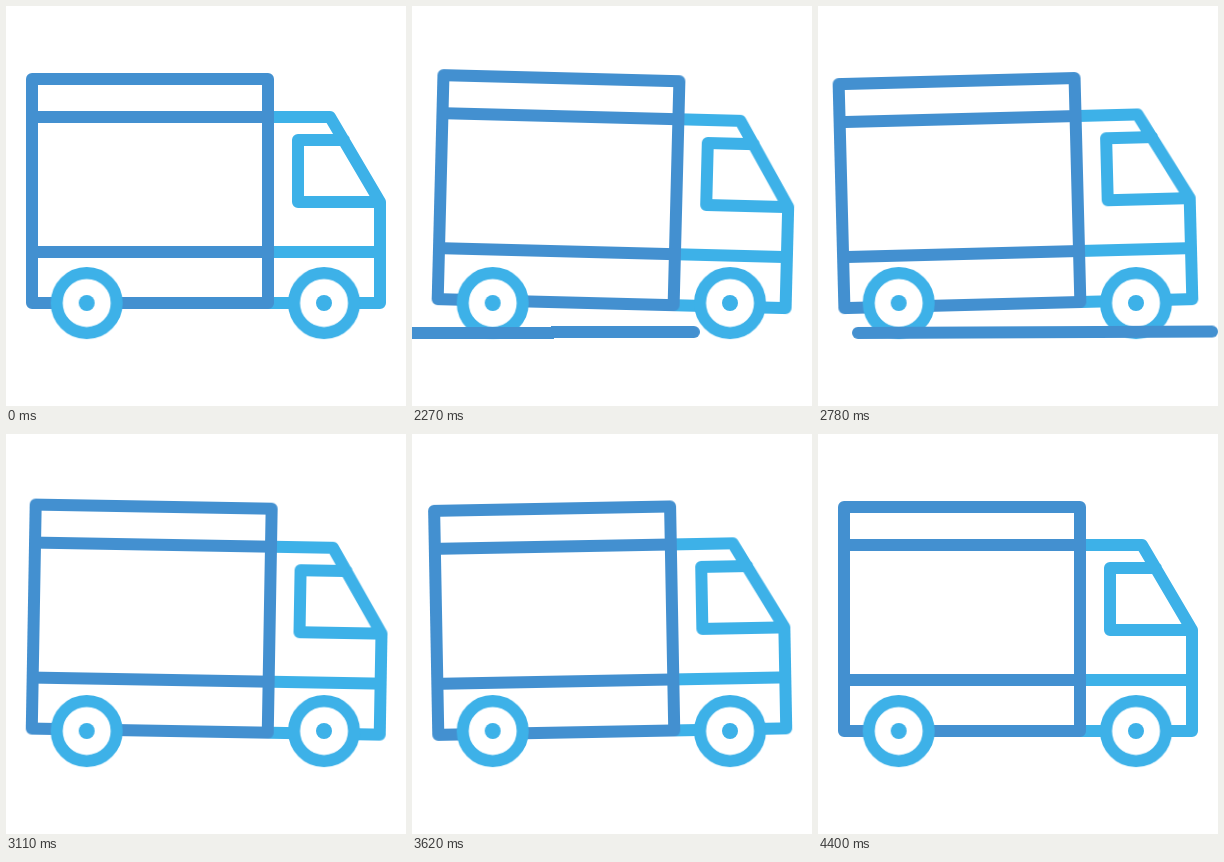
An HTML page without scripts that plays this animation: 400x400 px, repeating every 4430 ms.

```html
<!DOCTYPE html>
<html lang="en">
<head>
<meta charset="utf-8">
<title>Delivery truck</title>
<style>
  :root { --deep: #4390d0; --sky: #3db1e8; --loop: 4430ms; }
  html, body { margin: 0; width: 100%; height: 100%; overflow: hidden; background: #fff; }
  svg { display: block; width: 100%; height: 100%; }
  path, circle { fill: none; stroke-width: 12; stroke-linecap: round; stroke-linejoin: round; }
  .deep { stroke: var(--deep); }
  .sky { stroke: var(--sky); }
  .body { transform-origin: 200px 283px; animation: rock var(--loop) cubic-bezier(.4, 0, .4, 1) infinite; }
  .tyre { fill: #fff; animation: squash var(--loop) ease-in-out infinite; }
  .hub { fill: var(--sky); animation: dip var(--loop) ease-in-out infinite; }
  .road { animation: pass var(--loop) linear infinite backwards; }
  .second { animation-delay: 600ms; }
  .third { animation-delay: 1200ms; }

  @keyframes rock {
    0%, 45.15% { transform: none; }
    51.69%, 74.27% { transform: translateY(.6px) rotate(1.48deg); }
    62.98% { transform: translateY(.6px) rotate(-1.48deg); }
    85.55% { transform: translateY(.6px) rotate(-1.48deg); animation-timing-function: cubic-bezier(.4, 0, .2, 1); }
    98.19%, 100% { transform: none; }
  }
  @keyframes squash {
    0%, 45.15%, 57.34%, 68.62%, 79.91%, 95%, 100% { transform: none; }
    51.69%, 62.98%, 74.27%, 85.55% { transform: translateY(1px) scale(1.04, .955); }
  }
  @keyframes dip {
    0%, 45.15%, 57.34%, 68.62%, 79.91%, 95%, 100% { transform: none; }
    51.69%, 62.98%, 74.27%, 85.55% { transform: translateY(1px); }
  }
  @keyframes pass {
    0%, 45.82% { transform: translateX(770px); }
    49.21% { transform: translateX(395px); }
    50.56% { transform: translateX(336px); }
    51.24% { transform: translateX(284px); }
    54.63%, 100% { transform: translateX(-12px); }
  }
</style>
</head>
<body>
<svg viewBox="0 0 400 400">
  <defs>
    <g id="wheel">
      <circle class="sky tyre" r="30"/>
      <circle class="hub" r="8"/>
    </g>
    <path id="strip" d="M-354 0H0"/>
  </defs>
  <g class="body">
    <path class="sky" d="M262 111H324L374 196V297H262M262 246H374M338 134H292V196H374"/>
    <path class="deep" d="M26 73H262V297H26ZM26 111H262M26 246H262"/>
  </g>
  <use href="#wheel" x="80.7" y="297"/>
  <use href="#wheel" x="318" y="297"/>
  <g class="deep" transform="translate(0 327) rotate(-.2)">
    <use class="road" href="#strip"/>
    <use class="road second" href="#strip"/>
    <use class="road third" href="#strip"/>
  </g>
</svg>
</body>
</html>
```
